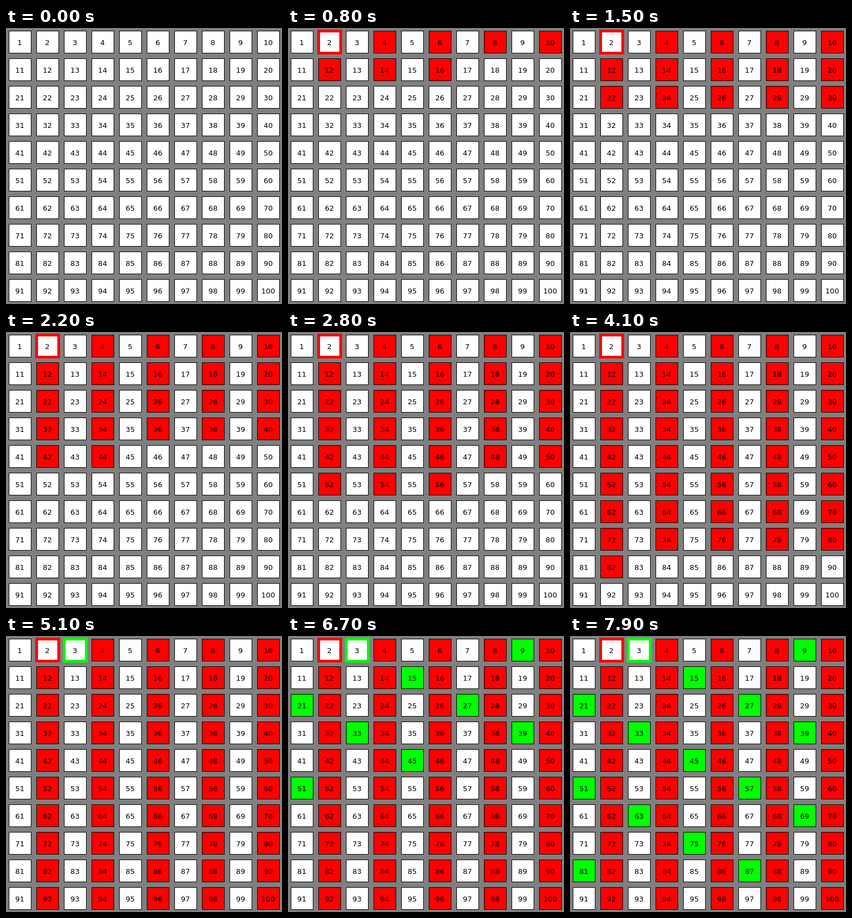
These frames come from a looping animation (500x500 px, 8 s). An HTML page with a canvas:

```html
<!DOCTYPE html>
<html lang="en">
<head>
<meta charset="utf-8">
<title>Sieve of Eratosthenes</title>
<style>
  html, body { margin: 0; width: 100%; height: 100%; overflow: hidden; background: #808080; }
  canvas { display: block; }
</style>
</head>
<body>
<canvas id="stage" width="500" height="500"></canvas>
<script>
const ctx = document.getElementById('stage').getContext('2d');
const LOOP = 8000;
const RED = '#f00', GREEN = '#0f0';

// Time at which each number is coloured: evens every 100 ms, odd multiples of 3 from 5100 ms.
function markOf(n) {
  if (n % 2 === 0) return { at: n * 50, color: RED };
  if (n % 3 === 0) return { at: 5100 + (n - 3) / 6 * 200, color: GREEN };
  return { at: Infinity };
}

function drawCell(n, time) {
  const x = (n - 1) % 10 * 50 + 5.5;
  const y = Math.floor((n - 1) / 10) * 50 + 5.5;
  const { at, color } = markOf(n);
  const marked = time >= at;
  const prime = n === 2 || n === 3;

  ctx.fillStyle = marked && !prime ? color : '#fff';
  ctx.fillRect(x, y, 40, 40);
  ctx.strokeStyle = marked && prime ? color : '#000';
  ctx.lineWidth = marked && prime ? 5 : 1;
  ctx.strokeRect(x, y, 40, 40);

  ctx.fillStyle = '#000';
  ctx.fillText(n, x + 19.5, y + 25.5);
}

function draw(now) {
  const time = now % LOOP;
  ctx.fillStyle = '#808080';
  ctx.fillRect(0, 0, 500, 500);
  ctx.font = '13px "DejaVu Sans", sans-serif';
  ctx.textAlign = 'center';
  for (let n = 1; n <= 100; n++) drawCell(n, time);
  requestAnimationFrame(draw);
}
requestAnimationFrame(draw);
</script>
</body>
</html>
```
